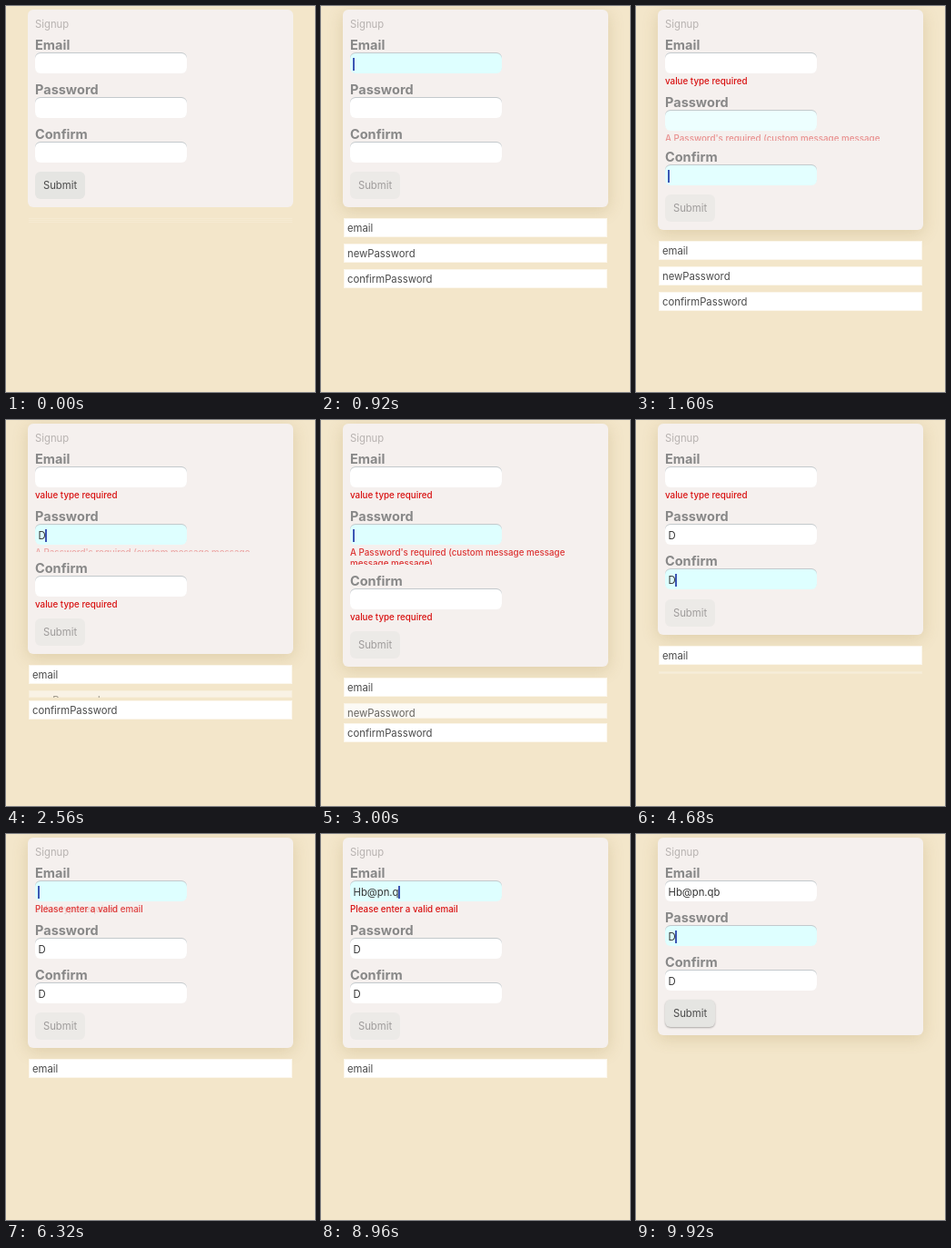
Write an HTML page that moves like this. It is 340 px wide and 424 px high and loops after 10 s.

```html
<!DOCTYPE html>
<html lang="en">
<head>
<meta charset="utf-8">
<title>Signup form</title>
<style>
  html, body { margin: 0; width: 100%; height: 100%; overflow: hidden; background: #f3e6ca; }
  body { display: flow-root; font: 11.3px/14px Inter, "Open Sans", sans-serif; color: #4a4a4a; }
  #card {
    width: 276px; margin: 4px 24px 12px; padding: 0 8px 9px;
    border-radius: 6px; background: #f5f0ee;
  }
  .legend { height: 21px; padding-top: 9px; color: #b8b3b1; }
  .field { padding-bottom: 9px; }
  .label { height: 18px; font-weight: 700; font-size: 14.5px; line-height: 18px; color: #888; }
  .input {
    box-sizing: border-box; width: 167px; height: 22px; padding: 5px 3.5px; display: flex;
    border-radius: 6px; box-shadow: 0 -1px 0 #c3c9cc; white-space: pre; color: #333;
  }
  .caret { width: 2px; height: 14px; margin-left: -1px; background: #3c56b4; }
  .errors { position: relative; overflow: hidden; }
  .errors div {
    position: absolute; top: 2.5px; font-size: 9.8px; font-weight: 500; line-height: 12px;
    color: #d81010; white-space: pre;
  }
  #submit {
    width: 55px; height: 30px; margin-top: 1px; border-radius: 6px; background: #e5e5e2;
    line-height: 31px; text-align: center;
  }
  #list { margin: 0 25px; }
  .item { box-sizing: border-box; overflow: hidden; background: #fff; box-shadow: inset 0 0 0 1px #fbf6ec; }
  .item div { padding: 4px; }
</style>
</head>
<body>
<div id="card">
  <div class="legend">Signup</div>
  <div id="fields"></div>
  <div id="submit">Submit</div>
</div>
<div id="list"></div>
<script>
const LOOP = 10000, SLIDE = 400, FADE = 240, LIST_LAG = 25, IDLE = 720;
const EMAIL = 0, PASSWORD = 1, CONFIRM = 2;
const REQUIRED = "value type required";
const INVALID = "Please enter a valid email";
const LONG = "A Password's required (custom message message\nmessage message)";

const fields = [
  { label: "Email", item: "email", tall: 14, notes: [REQUIRED, INVALID],
    check: v => !v ? REQUIRED : /@\w+\.\w{2}/.test(v) ? "" : INVALID },
  { label: "Password", item: "newPassword", tall: 26, notes: [LONG], check: v => v ? "" : LONG },
  { label: "Confirm", item: "confirmPassword", tall: 14, notes: [REQUIRED], check: v => v ? "" : REQUIRED }
];

// What the visitor does: a number moves the focus, a string is a key.
const steps = [
  [600, EMAIL], [1120, PASSWORD], [1430, CONFIRM], [1890, PASSWORD],
  [2290, "D"], [2676, "Backspace"], [3180, "D"],
  [3860, CONFIRM], [4310, "D"], [4960, EMAIL],
  [5680, "H"], [6240, "Backspace"], [6920, "H"], [7060, "b"], [8200, "@"],
  ...[..."pn.qb"].map((key, i) => [8600 + 120 * i, key]),
  [9600, PASSWORD]
];

const states = [{ time: 0, active: -1, values: ["", "", ""], touched: [] }];
for (const [time, act] of steps) {
  const last = states[states.length - 1];
  const next = { time, active: last.active, values: [...last.values], touched: [...last.touched] };
  if (typeof act === "number") {
    next.touched[last.active] = true;
    next.active = act;
  } else {
    next.values[last.active] = act === "Backspace" ? last.values[last.active].slice(0, -1) : last.values[last.active] + act;
  }
  states.push(next);
}

const $ = id => document.getElementById(id);
const clamp = x => Math.min(1, Math.max(0, x));
const problem = (s, i) => fields[i].check(s.values[i]);
const allValid = s => fields.every((f, i) => !problem(s, i));

function add(parent, cls, text = "") {
  const el = document.createElement("div");
  el.className = cls;
  el.textContent = text;
  return parent.appendChild(el);
}

// A value from 0 to 1 that rises while the test holds and falls while it does not.
function level(test, t, span = SLIDE, value = 0) {
  states.forEach((s, i) => {
    const end = Math.min(t, states[i + 1]?.time ?? LOOP);
    if (end > s.time) value = clamp(value + (test(s) ? 1 : -1) * (end - s.time) / span);
  });
  return value;
}

for (const f of fields) {
  const box = add($("fields"), "field");
  add(box, "label", f.label);
  f.input = add(box, "input");
  f.value = add(f.input, "value");
  f.caret = add(f.input, "caret");
  f.slot = add(box, "errors");
  f.noteEls = f.notes.map(note => add(f.slot, "", note));
  f.row = add($("list"), "item");
  add(f.row, "", f.item);
}

function draw(t) {
  const now = states.filter(s => s.time <= t).pop();
  const caret = 1 - clamp((t - now.time - IDLE) / FADE);

  fields.forEach((f, i) => {
    const tint = level(s => s.active === i, t, FADE);
    f.input.style.backgroundColor = `rgb(${255 - 33 * Math.sqrt(tint)}, 255, 255)`;
    f.value.textContent = now.values[i];
    f.caret.style.opacity = now.active === i ? caret : 0;

    const shown = f.notes.map(note => level(s => s.touched[i] && problem(s, i) === note, t));
    shown.forEach((k, n) => f.noteEls[n].style.opacity = k);
    f.slot.style.height = f.tall * clamp(shown.reduce((a, b) => a + b)) + "px";

    const k = level(s => problem(s, i), t - LIST_LAG, SLIDE, .07);
    f.row.style.height = 21 * k + "px";
    f.row.style.marginBottom = 7 * k + "px";
    f.row.style.opacity = .2 + .8 * k;
  });

  const lift = level(() => true, t), enabled = level(allValid, t, FADE, 1);
  $("card").style.boxShadow = `0 4px 18px rgba(140, 110, 40, ${.2 * lift})`;
  $("submit").style.opacity = .5 + .5 * enabled;
  $("submit").style.boxShadow = `0 1px 2px rgba(0, 0, 0, ${.3 * enabled * lift})`;
}

const start = performance.now();
function frame() {
  draw((performance.now() - start) % LOOP);
  requestAnimationFrame(frame);
}
frame();
</script>
</body>
</html>
```
